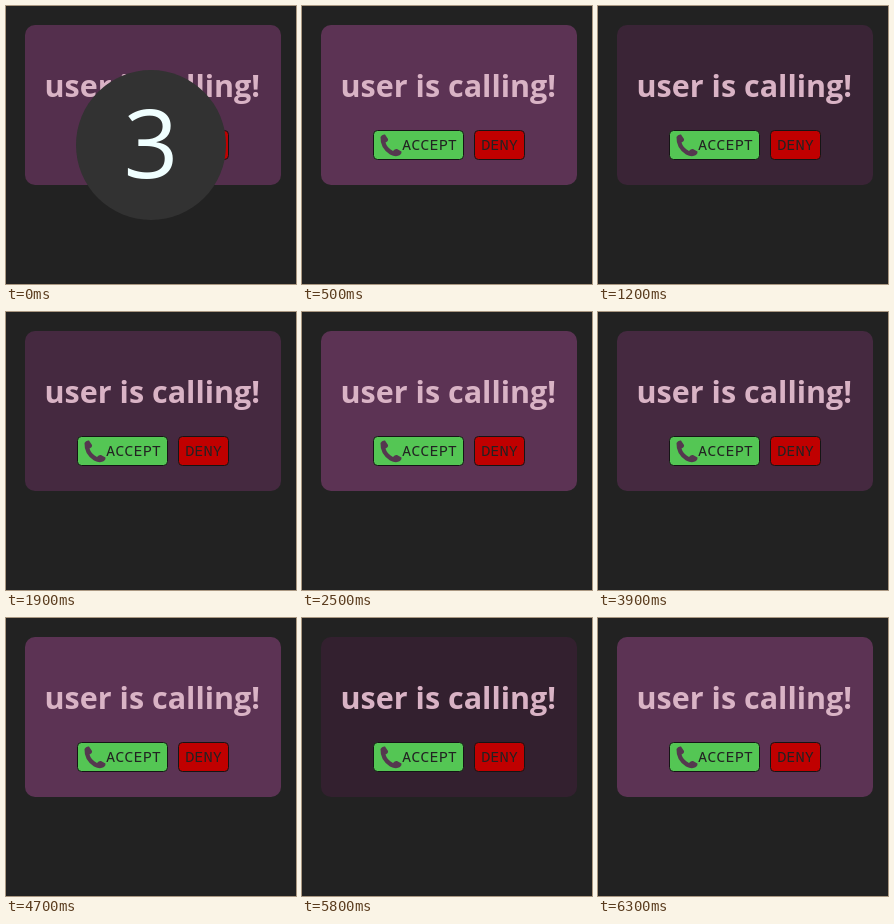
An HTML page that plays this animation: 290x278 px, repeating every 6400 ms.

```html
<!DOCTYPE html>
<html lang="en">
<head>
<meta charset="utf-8">
<title>Incoming call</title>
<style>
  html, body { margin: 0; width: 100%; height: 100%; overflow: hidden; background: #222; }
  svg { display: block; }
  text { text-anchor: middle; }
  .title { font: bold 30.5px "Open Sans", sans-serif; fill: #d9b3c5; }
  .label { font: 500 15.3px "Noto Sans Mono", monospace; fill: #222; }
  .digit { font: 96px "Open Sans", sans-serif; fill: azure; }
  .button { stroke: #151515; }
</style>
</head>
<body>
<svg width="290" height="278" viewBox="0 0 290 278">
  <rect id="card" x="19" y="19" width="256" height="160" rx="10"/>
  <text class="title" x="146.3" y="91">user is calling!</text>

  <rect class="button" x="71.5" y="124.5" width="90" height="29" rx="4" fill="#54c654"/>
  <path fill="#55384f" d="M78.5 131Q80 128 83 128.5L86 133Q86.5 135 83.5 136.5Q85 142 91 145Q93 142.5 95 143L99.5 145.5Q100 147 98 149Q94 151.5 88 148.5Q78 142 78.5 131Z"/>
  <text class="label" x="127.5" y="144">ACCEPT</text>

  <rect class="button" x="172.5" y="124.5" width="50" height="29" rx="4" fill="#c00000"/>
  <text class="label" x="197.5" y="144">DENY</text>

  <g id="countdown">
    <circle cx="145" cy="139" r="75" fill="#323232"/>
    <text class="digit" x="145" y="172">3</text>
  </g>
</svg>
<script>
  const LOOP = 6400, STEP = 100, PERIOD = 2000, DARKEST = 1520, FADE = 600;
  const DARK = [17, 17, 17], BRIGHT = [92, 51, 84];
  const card = document.getElementById('card');
  const countdown = document.getElementById('countdown');

  const smoothstep = x => x * x * (3 - 2 * x);

  function draw(now) {
    const time = Math.floor(now % LOOP / STEP) * STEP;
    const phase = (time + PERIOD - DARKEST) % PERIOD;
    const distance = Math.min(phase, PERIOD - phase);
    const glow = smoothstep(Math.min(1, distance / FADE));
    const color = DARK.map((c, i) => Math.round(c + (BRIGHT[i] - c) * glow));
    card.setAttribute('fill', `rgb(${color})`);
    countdown.style.display = time < STEP ? '' : 'none';
  }

  const start = performance.now();
  function tick() {
    draw(performance.now() - start);
    requestAnimationFrame(tick);
  }
  tick();
</script>
</body>
</html>
```
